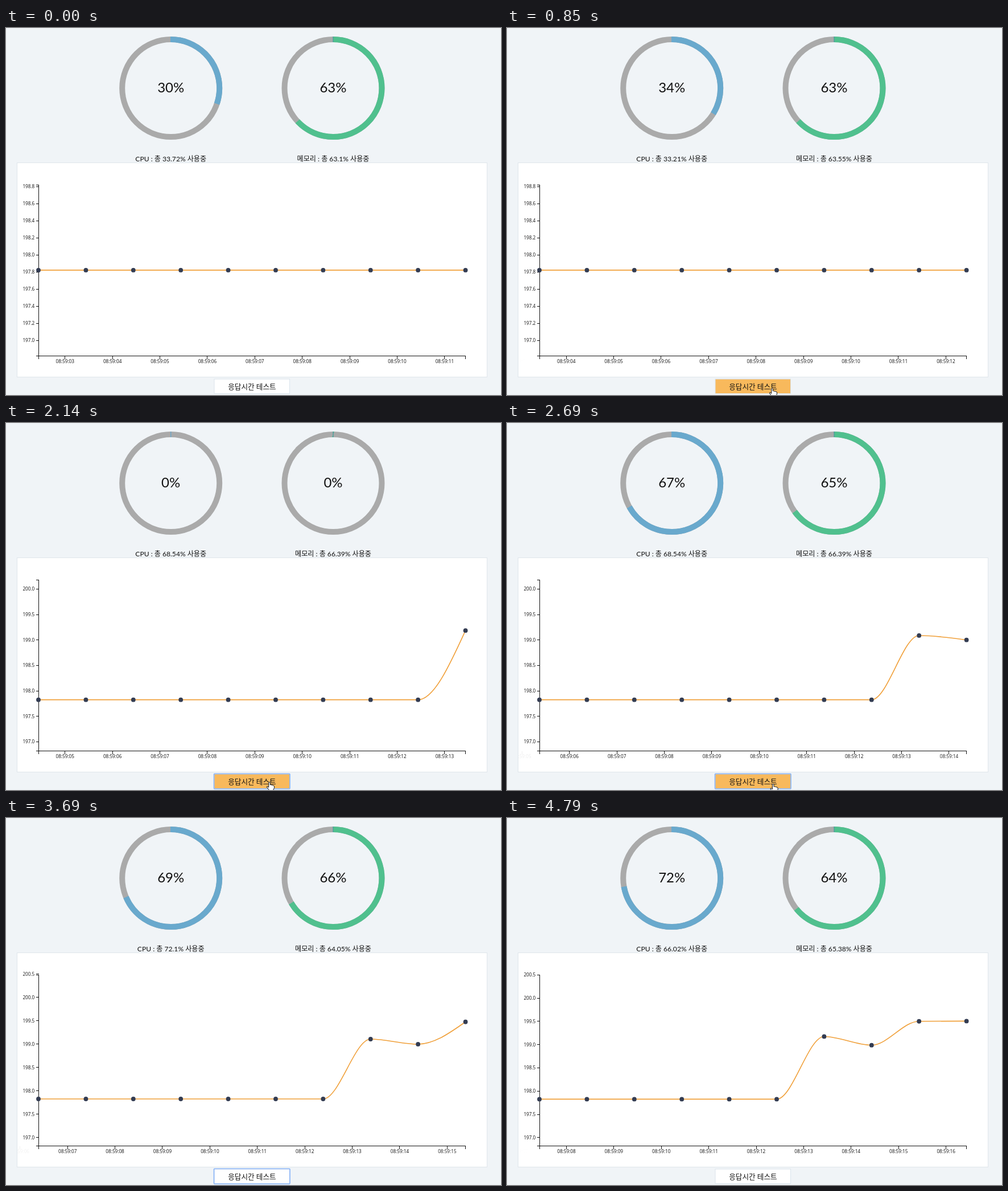
Write an HTML page that moves like this. It is 870 by 644 pixels and loops after 4820 ms.

```html
<!DOCTYPE html>
<html lang="ko">
<head>
<meta charset="utf-8">
<title>응답시간 테스트</title>
<style>
  html, body { margin: 0; width: 100%; height: 100%; overflow: hidden; background: #f0f4f7; }
  svg { display: block; }
  text { font-family: Lato, "Noto Sans CJK KR", "Noto Sans CJK", sans-serif; text-anchor: middle; fill: #111; }
  .percent { font-size: 24px; }
  .caption { font-size: 12.1px; }
  .label { font-size: 12.6px; }
  .tick text { font: 8.2px "Open Sans", "Noto Sans", sans-serif; }
  .tick line, .domain { stroke: #111; fill: none; shape-rendering: crispEdges; }
</style>
</head>
<body>
<svg id="stage" width="870" height="644" viewBox="0 0 870 644">
  <defs><clipPath id="clip"><rect x="19.5" y="237" width="826" height="376"/></clipPath></defs>
  <rect width="870" height="644" fill="#f0f4f7"/>
  <rect x="19.5" y="236.5" width="826" height="376" fill="#fff" stroke="#dfe6eb"/>
  <g id="chart" clip-path="url(#clip)">
    <g id="ticks"></g>
    <path class="domain" d="M52.5 275.5H57.5V575.5H52.5M57.5 580.5V575.5H807.5V580.5"/>
    <path id="curve" fill="none" stroke="#f0a03a" stroke-width="1.6"/>
    <g id="dots" fill="#333c52"></g>
  </g>
  <rect id="button" x="366" y="616" width="132.5" height="25.5" stroke="#dbe4ec"/>
  <rect id="ring" x="365.5" y="615.5" width="133.5" height="26.5" rx="1" fill="none" stroke="#4d90fe" stroke-opacity=".62" stroke-width="1.6"/>
  <text class="label" x="432.4" y="633.7">응답시간 테스트</text>
  <path id="hand" fill="#fff" stroke="#111" stroke-width="1" stroke-linejoin="round"
    d="M-1.3 .8Q0-.9 1.3 .8V5Q2.6 4.2 3.8 5.4Q5.2 4.8 6.2 6Q7.8 5.6 8.4 7.2V10.5L7 13.5V15.5H-.8V13.8L-4.6 9Q-4.8 7.2-3 7.8L-1.3 9.4Z"/>
</svg>
<script>
const LOOP = 4820, MOVE = 750, FILL = 500;
const LEFT = 57, STEP = 83.4, TOP = 274.8, BOTTOM = 575, COUNT = 10;
const TICK_SHIFT = .5;
const starts = [185, 1155, 2138, 3119, 4138];
const cpu = [30.2, 33.72, 33.21, 66.79, 68.54, 72.1, 66.02];
const memory = [63, 63.1, 63.55, 64.97, 66.39, 64.05, 65.38];
const latest = { 13: 199.18, 14: 198.98, 15: 199.5, 16: 199.5 };
// time, x, y of the fingertip
const pointer = [[0, 473, 652], [20, 472, 648], [250, 467, 633], [850, 466, 632], [1530, 469, 632],
  [2140, 463, 630], [2850, 469, 634], [3080, 475, 652]];

const $ = id => document.getElementById(id);
const lerp = (a, b, p) => a + (b - a) * p;
const clamp = v => Math.max(0, Math.min(1, v));
const ease = v => { const t = clamp(v); return t < .5 ? 4 * t ** 3 : 1 - 4 * (1 - t) ** 3; };

function add(parent, name, attrs = {}) {
  const node = document.createElementNS('http://www.w3.org/2000/svg', name);
  set(node, attrs);
  parent.appendChild(node);
  return node;
}
function set(node, attrs) {
  for (const key in attrs) node.setAttribute(key, attrs[key]);
}

// Monotone cubic tangents for evenly spaced points, as rise per step
function tangents(ys) {
  const d = ys.slice(1).map((y, i) => y - ys[i]);
  const m = ys.map((_, i) => {
    const a = d[i - 1], b = d[i];
    return (Math.sign(a) + Math.sign(b)) * Math.min(Math.abs(a), Math.abs(b), Math.abs(a + b) / 4) || 0;
  });
  const n = ys.length - 1;
  m[0] = (3 * d[0] - m[1]) / 2;
  m[n] = (3 * d[n - 1] - m[n - 1]) / 2;
  return m;
}

const stages = Array.from({ length: 6 }, (_, k) => {
  const data = Array.from({ length: COUNT }, (_, i) => latest[k + 2 + i] || 197.82);
  const low = Math.min(...data) - 1, high = Math.max(...data) + 1;
  const y = v => BOTTOM - (v - low) / (high - low) * (BOTTOM - TOP);
  const x = s => LEFT + (s - 2.446 - k) * STEP;
  const unit = high - low < 2.5 ? 2 : 5;
  const ys = data.map(y);
  return {
    x, y, ys, slopes: tangents(ys),
    hasX: s => s >= 3 + k && s <= 11 + k,
    hasY: n => n % unit === 0 && n / 10 > low && n / 10 < high + 1e-6
  };
});

const xTicks = [], yTicks = [];
for (let s = 3; s <= 16; s++) {
  const g = add($('ticks'), 'g', { class: 'tick' });
  add(g, 'line', { y1: 575.5, y2: 580.5 });
  add(g, 'text', { y: 587.6 }).textContent = '08:59:' + String(s).padStart(2, '0');
  xTicks.push({ g, s });
}
for (let n = 1970; n <= 2005; n++) {
  if (n % 2 && n % 5) continue;
  const g = add($('ticks'), 'g', { class: 'tick' });
  add(g, 'line', { x1: 52.5, x2: 57.5 });
  add(g, 'text', { x: 50.3, y: 3, style: 'text-anchor:end' }).textContent = (n / 10).toFixed(1);
  yTicks.push({ g, n });
}
const dots = Array.from({ length: COUNT }, (_, i) =>
  add($('dots'), 'circle', { r: 3.9, cx: LEFT + i * STEP }));

function gauge(cx, color, seam, title, values) {
  const cy = 105.6, r = 85.5, size = 2 * Math.PI * r;
  const ring = { cx, cy, r, fill: 'none', 'stroke-width': 10 };
  add($('stage'), 'circle', { ...ring, stroke: '#aaa' });
  const arc = add($('stage'), 'circle', { ...ring, stroke: color, transform: `rotate(-90 ${cx} ${cy})` });
  add($('stage'), 'path', { d: `M${cx} 15.1v10`, stroke: seam, 'stroke-width': 1.3 });
  const percent = add($('stage'), 'text', { class: 'percent', x: cx, y: 113 });
  const caption = add($('stage'), 'text', { class: 'caption', x: cx, y: 234 });
  return (stage, p) => {
    const v = values[stage] * p;
    set(arc, { 'stroke-dasharray': `${size * v / 100} ${size}`, opacity: v > 0 ? 1 : 0 });
    percent.textContent = Math.round(v) + '%';
    caption.textContent = `${title} : 총 ${values[stage + 1]}% 사용중`;
  };
}
const gauges = [
  gauge(289.7, '#69a9cd', '#69a9cd', 'CPU', cpu),
  gauge(575, '#50c08e', '#4d9a9f', '메모리', memory)
];

function placeTick(g, from, to, p, shownBefore, shownAfter, vertical) {
  const pos = lerp(from, to, p) + TICK_SHIFT;
  set(g, {
    transform: vertical ? `translate(0 ${pos})` : `translate(${pos} 0)`,
    opacity: lerp(+shownBefore, +shownAfter, p)
  });
}

function drawChart(a, b, p) {
  for (const { g, s } of xTicks) placeTick(g, a.x(s), b.x(s), p, a.hasX(s), b.hasX(s), false);
  for (const { g, n } of yTicks) placeTick(g, a.y(n / 10), b.y(n / 10), p, a.hasY(n), b.hasY(n), true);
  const ys = a.ys.map((y, i) => lerp(y, b.ys[i], p));
  const m = a.slopes.map((v, i) => lerp(v, b.slopes[i], p));
  let d = `M${LEFT} ${ys[0]}`;
  for (let i = 1; i < COUNT; i++) {
    const x = LEFT + i * STEP;
    d += `C${x - STEP * 2 / 3} ${ys[i - 1] + m[i - 1] / 3} ${x - STEP / 3} ${ys[i] - m[i] / 3} ${x} ${ys[i]}`;
  }
  set($('curve'), { d });
  dots.forEach((dot, i) => set(dot, { cy: ys[i] }));
}

function drawButton(t) {
  const i = pointer.findIndex(k => k[0] > t);
  let hover = false;
  if (i > 0) {
    const a = pointer[i - 1], b = pointer[i], p = (t - a[0]) / (b[0] - a[0]);
    const x = lerp(a[1], b[1], p), y = lerp(a[2], b[2], p);
    hover = y < 642;
    set($('hand'), { transform: `translate(${x} ${y})` });
  }
  set($('hand'), { opacity: i > 0 ? 1 : 0 });
  set($('button'), { fill: hover ? '#f8b95c' : '#fff' });
  set($('ring'), { opacity: t >= 1100 && t < 4730 ? 1 : 0 });
}

function draw(t) {
  const stage = starts.filter(s => s <= t).length;
  const since = stage ? t - starts[stage - 1] : LOOP;
  drawChart(stages[Math.max(0, stage - 1)], stages[stage], ease(since / MOVE));
  gauges.forEach(show => show(stage, ease(since / FILL)));
  drawButton(t);
}

const begin = performance.now();
function tick() {
  draw((performance.now() - begin) % LOOP);
  requestAnimationFrame(tick);
}
tick();
</script>
</body>
</html>
```
